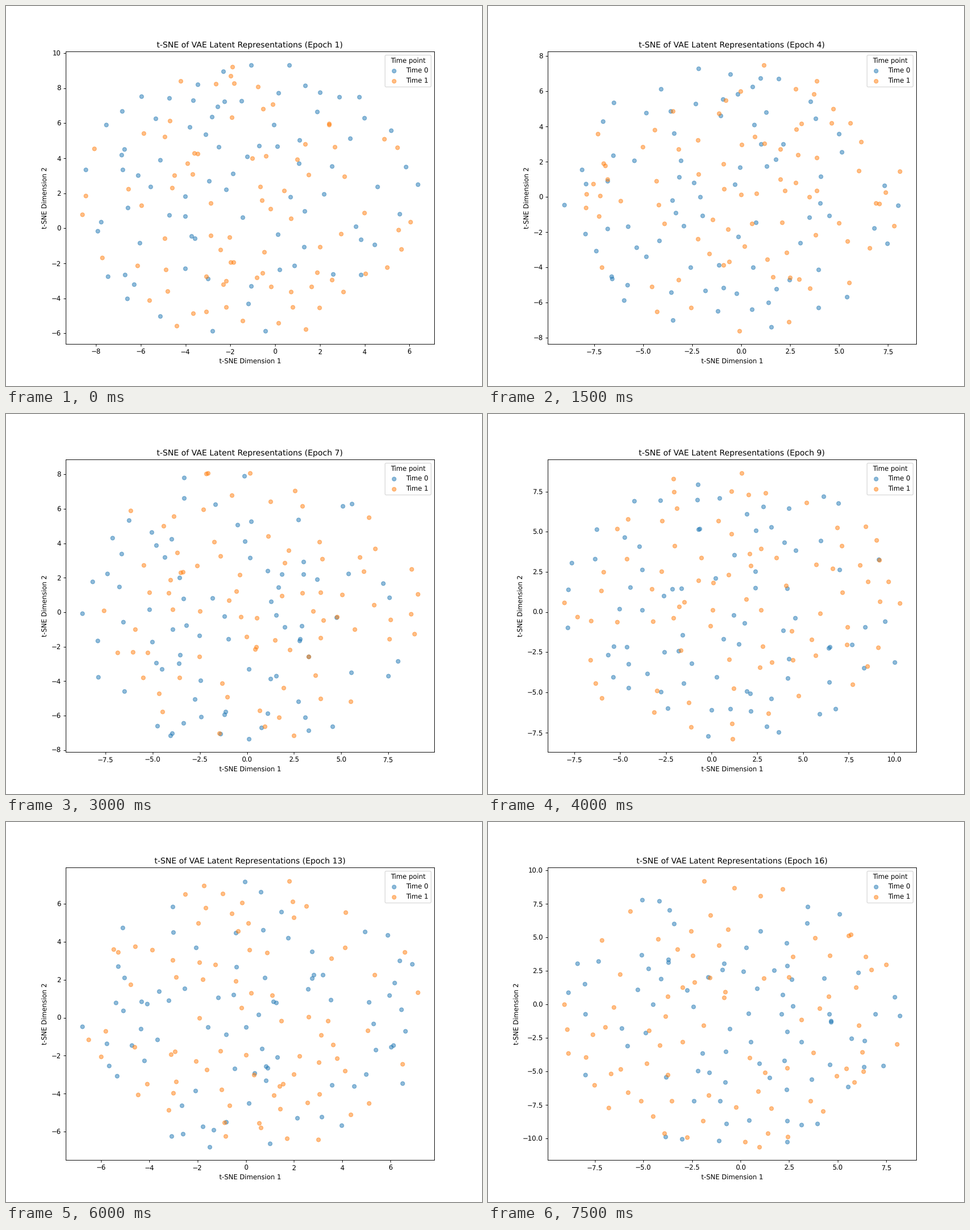
A matplotlib script that plays this animation: 837 by 669 pixels, repeating every 8000 ms.

```python
import numpy as np
import matplotlib.pyplot as plt
from matplotlib.animation import FuncAnimation

plt.rcParams["font.family"] = "DejaVu Sans"
plt.rcParams["text.hinting"] = "none"

EPOCHS = 16
PER_CLASS = 80
PAIRS = 14
COLORS = ("tab:blue", "tab:orange")

# Key extents of the embedding: epoch -> x min, x max, y min, y max.
# The epochs in between are interpolated.
EXTENTS = {
    1: (-8.61, 6.37, -5.86, 9.33),
    3: (-8.66, 8.33, -8.42, 7.48),
    5: (-9.43, 7.86, -6.82, 7.52),
    9: (-8.06, 10.29, -7.89, 8.66),
    11: (-6.63, 6.60, -7.64, 7.81),
    13: (-6.78, 7.13, -6.80, 7.20),
    16: (-9.08, 8.20, -10.62, 9.22),
}


def extent(epoch):
    columns = zip(*EXTENTS.values())
    return [np.interp(epoch, list(EXTENTS), column) for column in columns]


def disc(rng, n):
    """Random points in the unit disc, a little denser near the centre."""
    r = rng.random(n) ** 0.6
    a = rng.uniform(0, 2 * np.pi, n)
    return np.column_stack([r * np.cos(a), r * np.sin(a)])


def embedding(epoch):
    """Loosely spaced cloud with some close pairs, and its class labels."""
    rng = np.random.default_rng(epoch)
    pts = disc(rng, 1)
    while len(pts) < 2 * PER_CLASS - PAIRS:
        cand = disc(rng, 4)
        gap = np.linalg.norm(cand[:, None] - pts, axis=2).min(axis=1)
        pts = np.vstack([pts, cand[gap.argmax()]])
    mates = rng.choice(pts, PAIRS, replace=False)
    pts = np.vstack([pts, mates + rng.normal(0, 0.02, mates.shape)])

    x0, x1, y0, y1 = extent(epoch)
    pts = (pts - pts.min(axis=0)) / np.ptp(pts, axis=0)
    pts = pts * (x1 - x0, y1 - y0) + (x0, y0)
    return pts, rng.permutation(np.repeat([0, 1], PER_CLASS))


fig, ax = plt.subplots(figsize=(10, 7.993), dpi=83.7)


def draw(i):
    epoch = i + 1
    pts, labels = embedding(epoch)
    ax.clear()
    for t, color in enumerate(COLORS):
        ax.scatter(*pts[labels == t].T, color=color, alpha=0.5, label=f"Time {t}")
    ax.set_title(f"t-SNE of VAE Latent Representations (Epoch {epoch})")
    ax.set_xlabel("t-SNE Dimension 1")
    ax.set_ylabel("t-SNE Dimension 2")
    ax.legend(title="Time point", loc="upper right")


anim = FuncAnimation(fig, draw, frames=EPOCHS, interval=500, repeat=True)
plt.show()
```
